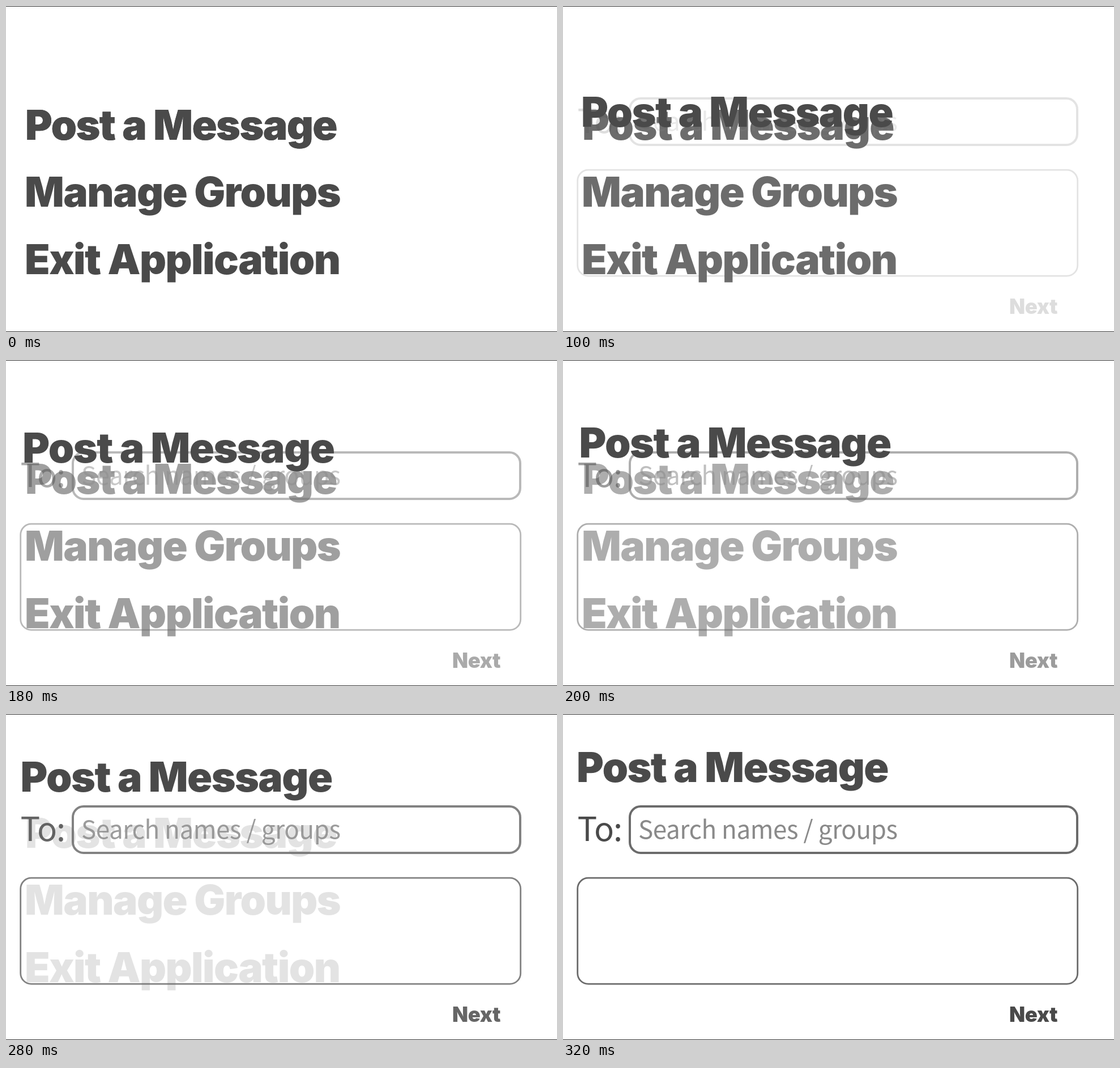
An HTML page with a canvas that plays this animation: 973x575 px, repeating every 0.56 s.

```html
<!DOCTYPE html>
<html lang="en">
<head>
<meta charset="utf-8">
<style>
  html, body { margin: 0; width: 100%; height: 100%; overflow: hidden; background: #fff; }
  canvas { display: block; }
</style>
</head>
<body>
<canvas id="stage" width="973" height="575"></canvas>
<script>
const ctx = document.getElementById('stage').getContext('2d');
const LOOP = 560, STEP = 20;
const HEAVY = 'Inter, sans-serif';
const LIGHT = '"Noto Sans CJK JP", "Noto Sans CJK", sans-serif';
const INK = '#4a4a4a', BORDER = '#6b6b6b', HINT = '#8a8a8a';

// Transition progress as [time, value] pairs, linear in between
const PROGRESS = [[40, 0], [100, 0.19], [140, 0.315], [180, 0.47], [240, 0.69], [320, 1]];

function progressAt(time) {
  if (time < 60) return 0;
  const i = PROGRESS.findIndex(([t]) => t >= time);
  if (i < 0) return 1;
  const [t0, v0] = PROGRESS[i - 1], [t1, v1] = PROGRESS[i];
  return v0 + (v1 - v0) * (time - t0) / (t1 - t0);
}

function write(text, x, y, size, weight, family, spacing, color = INK) {
  ctx.font = `${weight} ${size}px ${family}`;
  ctx.letterSpacing = `${spacing}px`;
  ctx.fillStyle = color;
  ctx.fillText(text, x, y);
}

const title = (text, x, y) => write(text, x, y, 73, 900, HEAVY, -1.6);

function box(x, y, w, h, radius, line) {
  ctx.strokeStyle = BORDER;
  ctx.lineWidth = line;
  ctx.beginPath();
  ctx.roundRect(x, y, w, h, radius);
  ctx.stroke();
}

function drawMenu() {
  title('Post a Message', 34, 235.5);
  title('Manage Groups', 33, 354);
  title('Exit Application', 33, 472.5);
}

function drawForm() {
  write('To:', 25.5, 223.5, 58, 300, LIGHT, -1);
  box(118, 163, 790, 82, 19, 4);
  write('Search names / groups', 133, 220, 44, 300, LIGHT, -0.45, HINT);
  box(25.7, 289.2, 883, 187, 19, 2.8);
  write('Next', 788, 543, 36.5, 900, HEAVY, -0.4);
}

function draw(time) {
  const p = progressAt(Math.floor(time / STEP) * STEP);
  ctx.globalAlpha = 1;
  ctx.fillStyle = '#fff';
  ctx.fillRect(0, 0, 973, 575);
  ctx.globalAlpha = 1 - p;
  drawMenu();
  ctx.globalAlpha = p;
  drawForm();
  ctx.globalAlpha = 1;
  title('Post a Message', 34 - 10 * p, 235.5 - 116 * p);
  ctx.fillStyle = '#333';
  ctx.fillRect(0, 0, 973, 1);
  ctx.fillRect(0, 574, 973, 1);
}

const start = performance.now();
function tick() {
  draw((performance.now() - start) % LOOP);
  requestAnimationFrame(tick);
}
tick();
</script>
</body>
</html>
```
